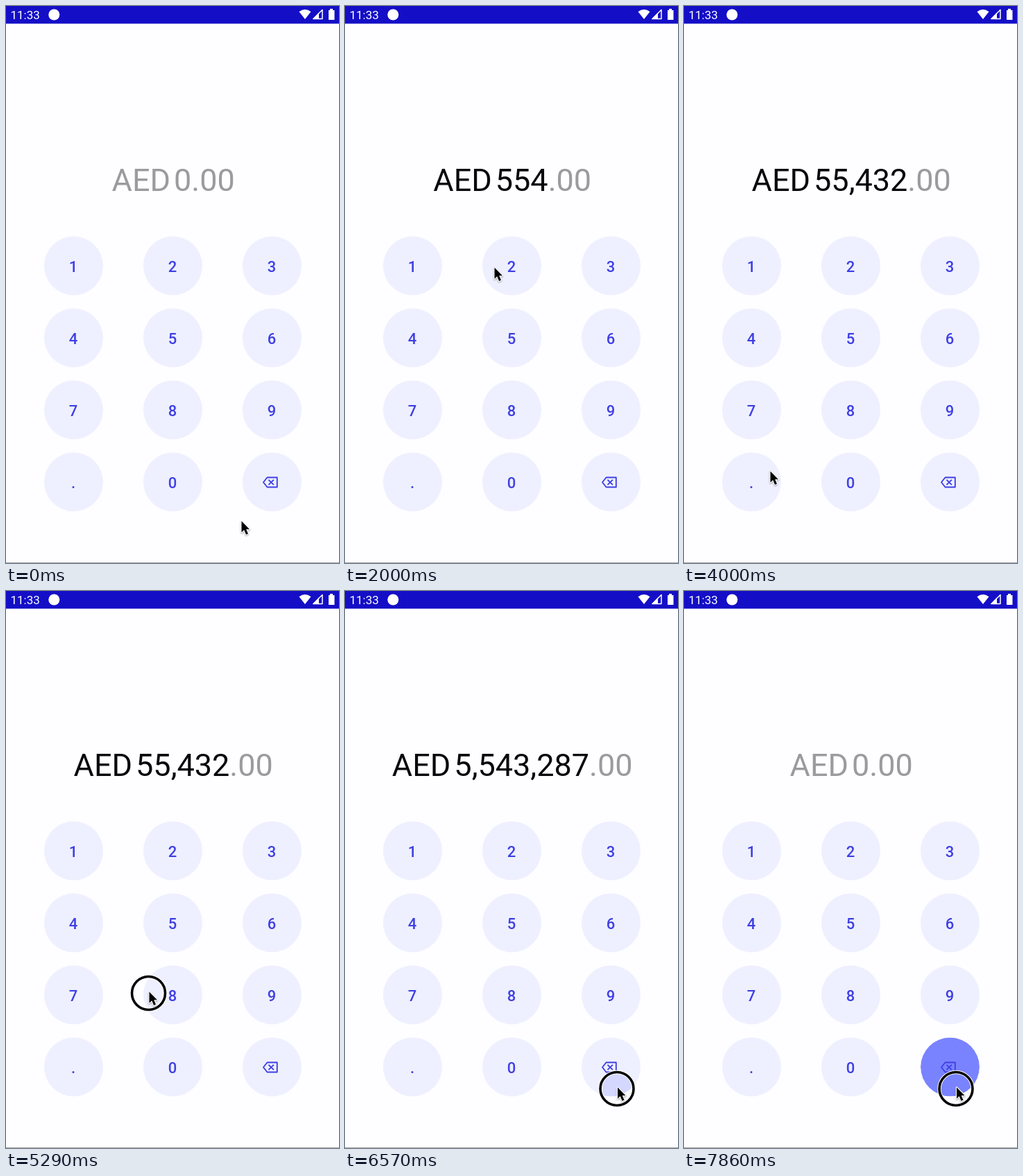
These frames come from a looping animation (480x804 px, 8000 ms). An HTML page with a canvas:

```html
<!DOCTYPE html>
<html lang="en">
<head>
<meta charset="utf-8">
<title>Amount keypad</title>
<style>
  html, body { margin: 0; width: 100%; height: 100%; overflow: hidden; background: #fefdff; }
  canvas { display: block; width: 480px; height: 804px; }
</style>
</head>
<body>
<canvas id="stage" width="480" height="804"></canvas>
<script>
const ctx = document.getElementById('stage').getContext('2d');
const LOOP = 8000, FPS = 7;
const BACKGROUND = '#fefdff', BAR = '#140fc6', BUTTON = '#eef0ff', INK = '#3f3fe4', HINT = '#9b9a9e';
const RADIUS = 42.5, BACK = '<';
const KEYS = [...'123456789.0' + BACK].map((name, i) => ({
  name, x: 97.5 + 143 * (i % 3), y: 375 + 104 * Math.floor(i / 3)
}));

const ARROW = new Path2D('M1 1.5V17.7L4.7 14.3L7.5 21L10.5 19.7L7.7 13.2H12.5Z');
const ERASE = new Path2D('M-12.5 .5L-7 -6.5H7.3V7.5H-7ZM-5 -3.2L2.4 4.2M2.4 -3.2L-5 4.2');
const WIFI = new Path2D('M431 19L422.5 8.2Q431 1.8 439.5 8.2Z');
const SIGNAL = new Path2D('M443 18.5H456V5.5Z');
const SIGNAL_LEVEL = new Path2D('M442 19H451V9.5Z');
const BATTERY = new Path2D('M465 6H467V4H471V6H473.5V20H465Z');

// The pointer reaches a key at the given step (1/7 s) and presses it unless it only hovers.
const visit = (at, name, dx = 12, dy = -7, hover = false) => {
  const key = KEYS.find(k => k.name === name);
  return { at, key, hover, x: key.x + dx, y: key.y + dy };
};
const VISITS = [
  visit(0, BACK, -45, 55, true),
  visit(5, '5'), visit(8, '5'), visit(11, '4'),
  visit(14, '2', -26, 1, true),
  visit(16, '3', -13), visit(19, '2', 14, -18),
  visit(28, '.', 26, -17, true),
  visit(37, '8', -35, -6), visit(41, '7'),
  visit(45, BACK, 8.5, 28)
];
const PRESSES = VISITS.filter(v => !v.hover);
const HOLD = PRESSES.pop();
const CLEAR_AFTER = 4, TRAVEL = 5;

const mix = (a, b, k) => a + (b - a) * k;

function pointerAt(step) {
  const next = VISITS.findIndex(v => v.at > step);
  if (next < 0) return HOLD;
  const from = VISITS[next - 1], to = VISITS[next];
  const start = Math.max(from.at + 1, to.at - TRAVEL);
  const k = Math.max(0, (step - start) / (to.at - start));
  const ease = k * k * (3 - 2 * k);
  return { x: mix(from.x, to.x, ease), y: mix(from.y, to.y, ease) };
}

function circle(x, y, r) {
  ctx.beginPath();
  ctx.arc(x, y, r, 0, 2 * Math.PI);
}

function disc(x, y, r, color) {
  circle(x, y, r);
  ctx.fillStyle = color;
  ctx.fill();
}

function outline(color, width, path) {
  ctx.strokeStyle = color;
  ctx.lineWidth = width;
  path ? ctx.stroke(path) : ctx.stroke();
}

function label(text, x, y, font, color, align = 'left') {
  ctx.font = `${font} Roboto, sans-serif`;
  ctx.textAlign = align;
  ctx.fillStyle = color;
  ctx.fillText(text, x, y);
  return ctx.measureText(text).width;
}

function drawStatusBar() {
  ctx.fillStyle = BAR;
  ctx.fillRect(0, 0, 480, 25.5);
  label('11:33', 6.5, 19, '17px', '#fff');
  disc(69.3, 12.5, 8, '#fff');
  for (const icon of [WIFI, SIGNAL_LEVEL, BATTERY]) ctx.fill(icon);
  outline('#fff', 1.5, SIGNAL);
}

function drawAmount(step) {
  const cleared = step >= HOLD.at + CLEAR_AFTER;
  const typed = cleared ? '' : PRESSES.filter(p => step >= p.at + 2).map(p => p.key.name).join('');
  const whole = Number(typed).toLocaleString('en-US');
  const color = typed ? '#08080a' : HINT, size = '45px', gap = 5, baseline = 266.5;
  ctx.font = `${size} Roboto, sans-serif`;
  let x = 241.2 - (ctx.measureText('AED' + whole + '.00').width + gap) / 2;
  x += label('AED', x, baseline, size, color) + gap;
  x += label(whole, x, baseline, size, color);
  label('.00', x, baseline, size, HINT);
}

function drawRipple(key, step) {
  const paint = (x, y, r, alpha) => disc(x, y, r, `rgba(8,24,255,${alpha})`);
  const tap = PRESSES.find(p => p.key === key && step > p.at && step < p.at + 3);
  if (tap && step === tap.at + 1) paint(mix(tap.x, key.x, .2), mix(tap.y, key.y, .2), 31, .27);
  else if (tap) paint(key.x, key.y, RADIUS, .2);

  const held = key === HOLD.key ? step - HOLD.at : 0;
  if (held === 1) paint(HOLD.x, HOLD.y + 2, 23, .11);
  else if (held > 1) paint(key.x, key.y, RADIUS, Math.min(.5, held * .14));
}

function drawKey(key, step) {
  const { name, x, y } = key;
  ctx.save();
  disc(x, y, RADIUS, BUTTON);
  ctx.clip();
  drawRipple(key, step);
  ctx.translate(x, y);
  if (name === BACK) outline(INK, 1.9, ERASE);
  else label(name, -.5, 9, '500 22px', INK, 'center');
  ctx.restore();
}

function drawPointer(step) {
  const { x, y } = pointerAt(step);
  ctx.save();
  ctx.translate(x, y);
  if (step >= HOLD.at || PRESSES.some(p => p.at === step)) {
    circle(0, 3.5, 24);
    outline('#fff', 5.5);
    outline('#000', 3.6);
  }
  ctx.shadowColor = 'rgba(0,0,0,.35)';
  ctx.shadowBlur = 2;
  ctx.shadowOffsetY = 1;
  outline('#fff', 2.4, ARROW);
  ctx.shadowColor = 'transparent';
  ctx.fillStyle = '#000';
  ctx.fill(ARROW);
  ctx.restore();
}

function draw() {
  // Steps begin up to a few milliseconds early because of rounding to 10 ms.
  const step = Math.floor((performance.now() + 4) % LOOP * FPS / 1000);
  ctx.fillStyle = BACKGROUND;
  ctx.fillRect(0, 0, 480, 804);
  ctx.fillStyle = '#a9a9ab';
  ctx.fillRect(0, 803, 480, 1);
  drawStatusBar();
  drawAmount(step);
  KEYS.forEach(key => drawKey(key, step));
  drawPointer(step);
  requestAnimationFrame(draw);
}

ctx.lineJoin = 'round';
draw();
</script>
</body>
</html>
```
